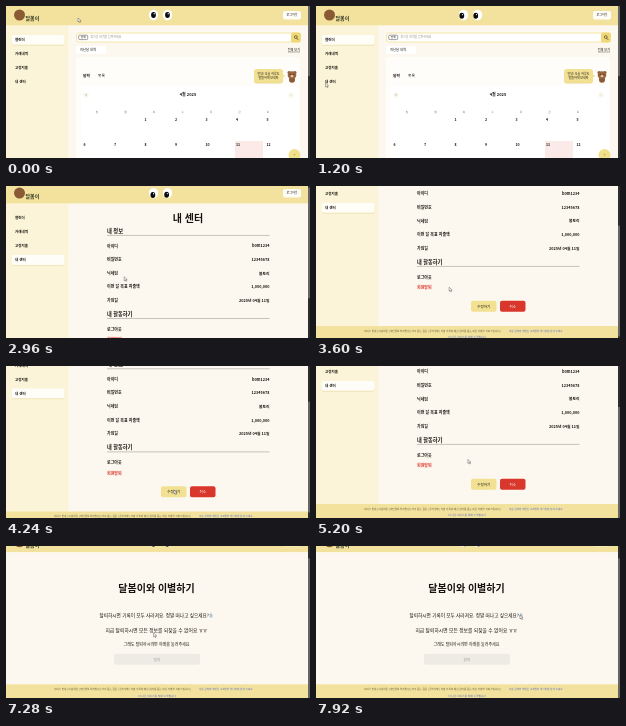
These frames come from a looping animation (304x152 px, 8 s). An HTML page:

```html
<!DOCTYPE html>
<html lang="ko">
<head>
<meta charset="utf-8">
<title>가계부</title>
<style>
html, body { margin: 0; width: 100%; height: 100%; overflow: hidden; background: #fdf8ef; }
svg { display: block; width: 100%; height: 100%; }
text { font-family: "Noto Sans CJK KR", "Noto Sans CJK", "Noto Sans", sans-serif; white-space: pre; }
</style>
</head>
<body>
<svg id="stage" viewBox="0 0 304 152" xmlns="http://www.w3.org/2000/svg"></svg>
<script>
const LOOP = 8000;
const HEAD = '#f3e29d', SIDE = '#fbf4d9', PAPER = '#fdf8ef', INK = '#16130f';
const YELLOW = '#f2e192', RED = '#d9362c', BROWN = '#8a5a35', LINK = '#5b6fc4';
const stage = document.getElementById('stage');

const rect = (x, y, w, h, fill, r = 0, extra = '') =>
  `<rect x="${x}" y="${y}" width="${w}" height="${h}" rx="${r}" fill="${fill}" ${extra}/>`;
const oval = (x, y, rx, ry, fill, extra = '') =>
  `<ellipse cx="${x}" cy="${y}" rx="${rx}" ry="${ry}" fill="${fill}" ${extra}/>`;
const line = (x1, y, x2, color, w = 0.5) =>
  `<path d="M${x1} ${y}H${x2}" stroke="${color}" stroke-width="${w}"/>`;
// y is the middle of the line of text
const text = (x, y, s, size, { anchor = 'start', weight = 500, fill = INK } = {}) =>
  `<text x="${x}" y="${y + size * 0.36}" font-size="${size}" font-weight="${weight}" text-anchor="${anchor}" fill="${fill}">${s}</text>`;
const group = (id, body) => `<g id="${id}">${body}</g>`;
const mid = { anchor: 'middle' };

function header() {
  return rect(0, 0, 304, 19.3, HEAD) +
    oval(13.5, 9, 5.5, 5.5, BROWN) +
    text(19.5, 12.5, '달봄이', 5, { weight: 900, fill: '#2d3320' }) +
    [147.5, 161.5].map(x => oval(x, 9, 4.7, 5.2, '#fff')).join('') +
    group('pupils', '') +
    rect(277, 5, 18, 8.5, '#fffdf7', 2) +
    text(286, 9.3, '로그아웃', 3, mid);
}

function sidebar(height, active) {
  const items = ['캘린더', '거래내역', '고정지출', '내 센터'];
  const top = 29 + active * 14;
  return rect(0, 19, 62.5, height, SIDE) +
    rect(5.5, top + 0.7, 53, 10, '#efe3b4', 2) +
    rect(5.5, top, 53, 9.8, '#fffdf8', 2) +
    items.map((s, i) => text(9, 34 + i * 14, s, 3.5, { weight: 700 })).join('');
}

function footer(y) {
  const info = '서비스 안내 | 이용약관 | 개인정보 처리방침 | 자주 묻는 질문 | 공지사항 | 지출 기록과 예산 관리를 돕는 작은 가계부 서비스입니다 |';
  return rect(0, y, 304, 30, HEAD) +
    text(48, y + 5, info, 2.55, { fill: '#5d5537' }) +
    text(193, y + 5, '이용 문의와 제안은 고객센터 게시판에 남겨 주세요', 2.55, { fill: LINK }) +
    text(151, y + 11.3, '더 나은 서비스를 위해 노력합니다', 2.7, { anchor: 'middle', fill: LINK });
}

function bear(x, y) {
  return oval(x - 3, y - 4, 1.5, 1.5, BROWN) + oval(x + 3, y - 4, 1.5, 1.5, BROWN) +
    oval(x, y + 3, 3, 3.2, BROWN) + oval(x, y - 1.5, 4.3, 3.8, '#996540') +
    oval(x, y - 0.3, 1.5, 1.1, '#e5c7a0') +
    oval(x - 1.9, y - 2, 0.4, 0.5, INK) + oval(x + 1.9, y - 2, 0.4, 0.5, INK);
}

function calendar() {
  const col = 30.5;
  let days = '';
  for (let d = 1; d <= 12; d++) {
    const i = d + 1;
    days += text(77.5 + (i % 7) * col, 114 + Math.floor(i / 7) * 25, d, 3.5, { weight: 700 });
  }
  const week = [...'일월화수목금토'].map((s, i) =>
    text(91 + i * 28.5, 106, s, 2.6, { anchor: 'middle', fill: '#77716a' })).join('');
  return rect(70.5, 27, 224, 9, '#fff', 2, `stroke="${YELLOW}" stroke-width="0.8"`) +
    rect(285, 26.6, 9.8, 9.8, '#f0d878', 2) +
    `<path d="M290.7 32.2l1.6 1.7" stroke="${INK}" stroke-width="0.6"/>` +
    oval(289.8, 31, 1.4, 1.4, 'none', `stroke="${INK}" stroke-width="0.5"`) +
    rect(72.7, 29.2, 9, 4.4, '#fff', 1, `stroke="${INK}" stroke-width="0.4"`) +
    text(77.2, 31.4, '전체', 2.7, mid) +
    text(84.5, 31.4, '찾으실 내역을 입력하세요', 2.9, { fill: '#928c83' }) +
    rect(70, 40, 30, 8, '#fff', 1.5) +
    text(74, 44, '지난달 내역', 3.3) +
    text(294, 44, '전체 보기', 3.1, { anchor: 'end' }) + line(282, 46, 294, INK, 0.35) +
    rect(70, 51, 224, 120, '#fffdfa', 4) +
    text(77, 69.5, '달력', 3.7, { weight: 700 }) + text(92, 69.5, '목록', 3.7) +
    rect(248, 63.5, 29, 14, '#e8d68d', 3) +
    rect(248, 63, 29, 13.7, YELLOW, 3) +
    `<path d="M276 68l3.5 2-3.5 2z" fill="${YELLOW}"/>` +
    text(262.5, 67.5, '안녕! 오늘 하루도', 3, mid) +
    text(262.5, 72.3, '알뜰하게 보내자', 3, mid) +
    bear(286, 70.5) +
    rect(75, 80, 218, 90, '#fff', 2) +
    oval(80, 89, 2.7, 2.7, '#faf6ea') + oval(285, 89, 2.7, 2.7, '#faf6ea') +
    text(80, 88.7, '‹', 4, mid) + text(285, 88.7, '›', 4, { anchor: 'middle', fill: '#b5aea5' }) +
    text(182, 89, '4월 2025', 4, { anchor: 'middle', weight: 700 }) +
    week + rect(229, 135, 28, 20, '#fbeae8') + days +
    oval(288.5, 149, 6, 6, '#f2df8c') +
    text(288.5, 149, '+', 4, { anchor: 'middle', fill: '#8d7a34' });
}

function center() {
  const rows = [
    ['아이디', 'bom1234'], ['비밀번호', '12345678'], ['닉네임', '봄토리'],
    ['이번 달 목표 지출액', '1,000,000'], ['가입일', '2025년 04월 11일']
  ];
  const button = (x, fill, label, color) => rect(x, 168.8, 25.5, 11, fill, 2) +
    text(x + 12.7, 174.3, label, 3.5, { anchor: 'middle', fill: color });
  return text(182, 34, '내 센터', 10, { anchor: 'middle', weight: 800 }) +
    text(101, 47, '내 정보', 5.3, { weight: 700 }) + line(101, 51.3, 263.5, '#8f8a83') +
    rows.map(([k, v], i) => {
      const y = 62 + i * 13.55;
      return text(101, y, k, 4, { weight: 600 }) + text(263.5, y, v, 3.8, { anchor: 'end', weight: 600 });
    }).join('') +
    text(101, 130, '내 활동하기', 5.2, { weight: 700 }) + line(101, 134.4, 263.5, '#8f8a83') +
    text(101, 145.2, '로그아웃', 4, { weight: 600 }) +
    text(101, 155.8, '회원탈퇴', 4, { weight: 600, fill: RED }) +
    button(155, YELLOW, '수정하기', INK) + button(184, RED, '취소', '#fff') +
    group('hover', rect(184, 168.8, 25.5, 11, '#a8221b', 2, 'opacity="0.35"'));
}

function farewell() {
  return text(150.5, 55.3, '달봄이와 이별하기', 10, { anchor: 'middle', weight: 800 }) +
    text(93.5, 82.3, '탈퇴하시면 기록이 모두 사라져요. 정말 떠나고 싶으세요?', 4.65) +
    `<path d="M205 79.8q3.4 4.6 0 5.2q-3.4-.6 0-5.2z" fill="#b7c7d8"/>` +
    text(150.5, 97, '지금 탈퇴하시면 모든 정보를 되찾을 수 없어요 ㅠㅠ', 4.8, mid) +
    text(150.5, 111.4, '그래도 탈퇴하시려면 아래를 눌러주세요', 4, mid) +
    rect(108, 121, 86, 11, '#eeebe5', 2) +
    text(151, 126.5, '탈퇴', 3.8, { anchor: 'middle', fill: '#aaa6a0' });
}

const PAGES = [
  { from: 0, height: 330, body: sidebar(330, 0) + calendar() },
  { from: 1600, height: 208, body: sidebar(190, 3) + center() + footer(194) },
  { from: 6880, height: 165, body: farewell() + footer(151.5) }
];

// time, x, y
const POINTER = [
  [0, 72, 12], [450, 55, 40], [960, 11, 76], [1200, 9.5, 77], [1700, 9.5, 77],
  [2400, 110, 84], [3300, 122, 94], [4240, 168, 124], [4960, 120, 75], [5500, 196, 119],
  [5800, 196, 120], [6240, 171, 119], [6680, 107, 100], [6960, 107, 100], [7680, 204, 69], [8000, 204, 69]
];
// time, offset
const SCROLL = [
  [0, 0], [2880, 0], [3600, 54], [3760, 56], [4080, 56], [4240, 48.5],
  [4480, 45], [4880, 56], [6879, 56], [6880, 13.2], [8000, 13.2]
];

function track(keys, t) {
  const n = keys.findIndex(k => k[0] > t);
  if (n < 1) return keys[n < 0 ? keys.length - 1 : 0].slice(1);
  const a = keys[n - 1], b = keys[n];
  const p = (t - a[0]) / (b[0] - a[0]);
  const e = p * p * (3 - 2 * p);
  return a.slice(1).map((v, i) => v + (b[i + 1] - v) * e);
}

stage.innerHTML = rect(0, 0, 304, 152, PAPER) +
  group('scroller', PAGES.map((p, i) => group('page' + i, p.body)).join('') + header()) +
  rect(302, 0, 2, 152, '#2d2d2d') +
  rect(302.4, 0, 1.2, 10, '#8c8c8c', 0.6, 'id="thumb"') +
  `<path id="pointer" d="M0 0v4l1-.9 .7 1.5 .7-.3-.7-1.5h1.4z" fill="#fff" stroke="#222" stroke-width="0.35"/>`;

const $ = id => document.getElementById(id);

function draw(t) {
  const current = PAGES.findLastIndex(p => t >= p.from);
  const page = PAGES[current];
  const [scroll] = track(SCROLL, t);
  const [x, y] = track(POINTER, t);
  PAGES.forEach((p, i) => $('page' + i).setAttribute('display', i === current ? 'inline' : 'none'));
  $('scroller').setAttribute('transform', `translate(0 ${-scroll})`);
  $('pointer').setAttribute('transform', `translate(${x} ${y})`);

  const size = 152 * 152 / page.height;
  $('thumb').setAttribute('height', size);
  $('thumb').setAttribute('y', scroll * 152 / page.height);

  const overRed = x > 184 && x < 209.5 && y + scroll > 168.8 && y + scroll < 179.8;
  $('hover').setAttribute('display', overRed ? 'inline' : 'none');

  // the eyes look ahead at first, then follow the pointer
  const gaze = 1.9 * Math.min(1, t / 400);
  $('pupils').innerHTML = [147.5, 161.5].map(cx => {
    const a = Math.atan2(y + scroll - 9, x - cx);
    const px = cx + Math.cos(a) * gaze, py = 9 + Math.sin(a) * gaze;
    return oval(px, py, 2.4, 3, '#0b0b0b') + oval(px + 0.7, py - 1.2, 0.6, 0.7, '#fff');
  }).join('');
}

function tick(now) {
  draw(now % LOOP);
  requestAnimationFrame(tick);
}
draw(0);
requestAnimationFrame(tick);
</script>
</body>
</html>
```
